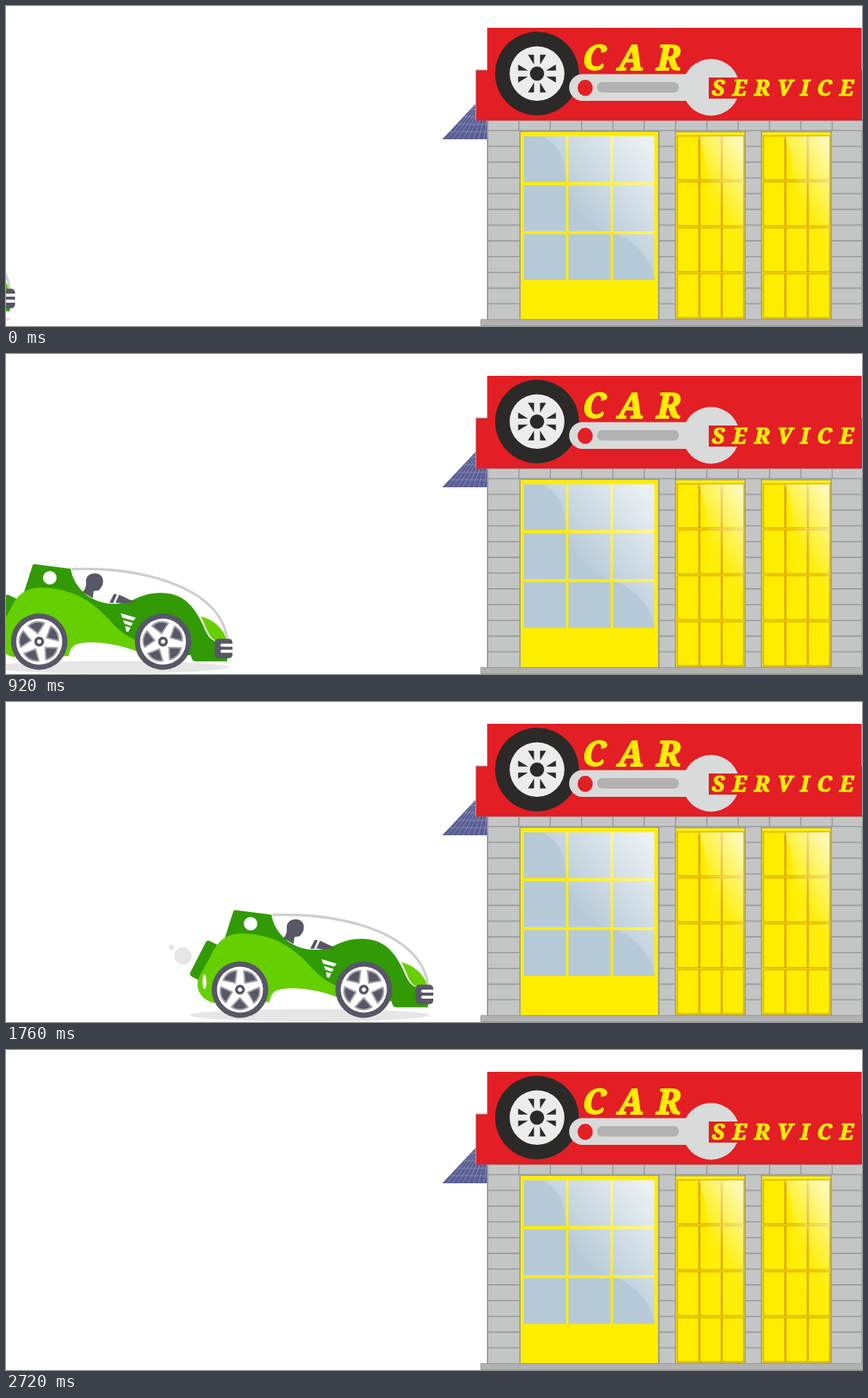
An HTML page for the animation above (3.12 s loop, 1134 by 425 pixels).

```html
<!DOCTYPE html>
<html lang="en">
<head>
<meta charset="utf-8">
<title>Car service</title>
<style>
html, body { margin: 0; width: 100%; height: 100%; overflow: hidden; background: #fff; }
svg { display: block; width: 100%; height: 100%; }
text { font-family: "Noto Serif", "Liberation Serif", serif; font-weight: 900; font-style: italic; fill: #ffed00; stroke: #ffed00; }
</style>
</head>
<body>
<svg viewBox="0 0 1134 425">
  <defs>
    <linearGradient id="glass" gradientUnits="userSpaceOnUse" x1="852" y1="185" x2="757" y2="262">
      <stop offset="0" stop-color="#fff" stop-opacity=".72"/>
      <stop offset="1" stop-color="#fff" stop-opacity=".06"/>
    </linearGradient>
    <linearGradient id="shine" gradientUnits="userSpaceOnUse" x1="92" y1="30" x2="36" y2="62">
      <stop offset="0" stop-color="#fff" stop-opacity=".7"/>
      <stop offset="1" stop-color="#fff" stop-opacity=".04"/>
    </linearGradient>
    <g id="wheel"></g>
  </defs>

  <g id="car">
    <ellipse cx="256" cy="416" rx="159" ry="8.3" fill="#e6e6e6"/>
    <g id="smoke" fill="#e6e6e6"></g>
    <g id="body">
      <path d="M119 319Q121 317 124 318L134 323L111 371L100 365Q97 363 98 360Z" fill="#329a05"/>
      <path d="M142 320L155 279Q156 276.500 159 277L206 283C207 298 222 324 254 329C288 333 292 315 325 315C358 315 371 337 381 358C386 371 391 377 397 379L413 401V406H371Q366 406 365 398L292 392C262 372 225 320 142 320Z" fill="#329a05"/>
      <path d="M128 400C110 394 105 380 109 368C113 358 120 349 126 336C135 316 148 308 166 308C210 308 238 330 256 350C270 366 282 374 295 379L296 394C272 383 228 376 210 385Q204 390 203 399Z" fill="#66cf00"/>
      <path d="M378 346C395 351 408 362 412 377L397 378C389 375 385 360 378 346Z" fill="#66cf00"/>
      <path d="M207 283.500C312 280 407 313 413 378" fill="none" stroke="#cecece" stroke-width="3.2"/>
      <g fill="#575766">
        <path d="M226 299C226 287 247 285 248.500 298C249 306 245 309 243 311.500C240 313 236.500 311 236 314L235 322L221.500 314Q227 309 226 299Z"/>
        <path d="M257 328L263 316.500L267 317L262 328.500ZM265 328L270 317.500L290 327Q278 330 265 328Z"/>
        <rect x="396.500" y="376" width="23.500" height="26" rx="5"/>
      </g>
      <path d="M420 384.500H406M420 392.500H406" stroke="#fff" stroke-width="4" stroke-linecap="round"/>
      <ellipse cx="117" cy="372" rx="2.600" ry="10" fill="#fff"/>
      <path d="M272 342L292 348L289 352L274 348ZM275 351L288 355L286 359L277 356ZM278 359L285 361L282 367L279 366Z" fill="#fff"/>
      <circle cx="178" cy="295" r="9" fill="#fff"/>
    </g>
    <g id="wheels"></g>
  </g>

  <g id="garage">
    <path d="M578 177L624 128H638V177Z" fill="#585d94"/>
    <path id="solar" fill="none" stroke="#9a9cbc" stroke-width=".7"/>
    <rect x="638" y="152" width="498" height="265" fill="#c4c6c6" stroke="#98999b" stroke-width="1.600"/>
    <path id="joints" stroke="#98999b" stroke-width="1.600"/>
    <rect x="629" y="416.500" width="510" height="8" fill="#b2b2b2" stroke="#999a9b"/>
    <path d="M638 29H1133.500V85H1134V152H623V85H638Z" fill="#e31e24"/>
    <path d="M637.500 29V85H622.500V152M1133.500 29V85" fill="none" stroke="#a8a0a0"/>
    <rect x="681" y="166.500" width="183.500" height="250" fill="#ffed00" stroke="#98999b" stroke-width="1.300"/>
    <path id="panes" fill="#b7cad8"/>
    <path d="M710 173H859V363C855 335 832 309 801 300C752 285 742 237 740 213C738 195 725 180 710 173Z" fill="url(#glass)"/>
    <g id="doors"></g>
  </g>

  <g id="sign">
    <circle cx="703.500" cy="89.700" r="55.500" fill="#2b2a29"/>
    <circle cx="703.500" cy="89.700" r="36.300" fill="#ececec"/>
    <g id="rim" fill="#2b2a29" transform="translate(703.500 89.700)"><circle r="9.500"/></g>
    <g fill="#d9dada">
      <rect x="746" y="90.500" width="180" height="35.500" rx="17.700"/>
      <circle cx="934" cy="108" r="37.700"/>
    </g>
    <rect x="931" y="95" width="203" height="28" fill="#e31e24"/>
    <rect x="783" y="101" width="108.500" height="14" rx="7" fill="#b2b2b2"/>
    <ellipse cx="767.300" cy="108.700" rx="10" ry="10.700" fill="#e31e24"/>
    <text x="764" y="84.500" font-size="45" letter-spacing="17" stroke-width="1.800">CAR</text>
    <text x="935" y="118.500" font-size="29" letter-spacing="10.500" stroke-width="1.200">SERVICE</text>
  </g>
</svg>

<script>
const $ = id => document.getElementById(id);
const LOOP = 3120, STEP = 40, GONE = 2720;
const range = (n, f) => Array.from({ length: n }, (_, i) => f(i)).join('');
const box = (x, y, w, h) => `M${x} ${y}h${w}v${h}h${-w}z`;

// Brickwork: one row of blocks on top, then four pillars
$('joints').setAttribute('d',
  'M638 165.500H1134' + range(11, i => `M${679.5 + i * 41.5} 152v13`) +
  [[638, 681], [865, 887], [979, 1001], [1093, 1134]].map(([a, b]) =>
    `M${b} 165V417M${a} 165V417` + range(11, i => `M${a} ${186.5 + i * 20.9}H${b}`)).join(''));

$('solar').setAttribute('d',
  range(8, i => `M${584 + i * 7} 177L${626 + i * 2} 128`) +
  range(4, i => `M${587 + i * 9} ${167 - i * 10}H638`));

$('panes').setAttribute('d',
  range(9, i => box(686 + i % 3 * 59, 173 + (i / 3 | 0) * 65, i % 3 > 1 ? 55 : 56, 61)));

$('doors').innerHTML = [887, 1001].map(x => `<g transform="translate(${x} 167)">
  <rect width="92" height="249" fill="#ffed00" stroke="#98999b" stroke-width="1.300"/>
  <path d="${range(12, i => box(2.5 + i % 3 * 29.7, 5.5 + (i / 3 | 0) * 61, 28.3, 58.5))}" fill="none" stroke="#dfaa00" stroke-width="1.500"/>
  <path d="M29 6H90V247C86 205 72 182 58 160C45 140 47 110 43 78C41 40 37 18 29 6Z" fill="url(#shine)"/>
</g>`).join('');

$('rim').innerHTML += range(4, i =>
  `<path d="M-4 -25V-12L-12 -25ZM4 -25V-12L12 -25Z" transform="rotate(${i * 90})"/>`);

$('wheel').innerHTML = '<circle r="37.500" fill="#575766"/><circle r="30.500" fill="#fff"/>' +
  range(5, i => `<path d="M0 -11L-11 -23Q0 -30 11 -23Z" fill="#575766" stroke="#a2a2ac" stroke-width="2" stroke-linejoin="round" transform="rotate(${36 + i * 72})"/>`) +
  '<circle r="6.500" fill="#575766"/><circle r="2.800" fill="#fff"/>';
$('wheels').innerHTML = '<use href="#wheel"/>'.repeat(2);
const wheels = [...$('wheels').children];

// Position of the nose: [time, x]
const path = [[0, 12], [560, 189], [600, 203], [920, 300], [1280, 420], [1760, 566], [2080, 657], [2240, 701], [GONE, 962]];
function noseAt(t) {
  const i = Math.max(1, path.findIndex(p => p[0] >= t));
  const [t0, x0] = path[i - 1], [t1, x1] = path[i];
  return x0 + (x1 - x0) * (t - t0) / (t1 - t0);
}

// Exhaust puffs: birth, end, drift, rise, radius, fade rate
const puffs = [
  [1100, 2000, 38, 14, 6, .05],
  [1240, 2000, 25.5, 3, 11.5, .55],
  [2000, 2560, 26, 3, 11, .55]
];
function puff(t, [birth, end, drift, rise, size, fade]) {
  if (t < birth || t > end) return '';
  const u = ((t - birth) / 630) ** .4;
  const r = Math.min(size * Math.min(1, .5 + u), Math.sqrt(fade * (end - t)));
  return `<circle cx="${112 - drift * u}" cy="${340 - rise * u}" r="${r}"/>`;
}

function draw(now) {
  const t = Math.floor(now % LOOP / STEP) * STEP;
  $('car').style.display = t < GONE ? '' : 'none';
  if (t < GONE) {
    const x = noseAt(t);
    const bob = .8 + 2.7 * Math.sin((t - 1280) / 240 * 2 * Math.PI - Math.PI / 6);
    $('car').setAttribute('transform', `translate(${x - 420} 0)`);
    $('body').setAttribute('transform', `translate(0 ${bob})`);
    wheels.forEach((w, i) =>
      w.setAttribute('transform', `translate(${164 + i * 164} 382) rotate(${x / 37.5 * 180 / Math.PI})`));
    $('smoke').innerHTML = puffs.map(p => puff(t, p)).join('');
  }
}
const start = performance.now();
function tick() {
  draw(performance.now() - start);
  requestAnimationFrame(tick);
}
tick();
</script>
</body>
</html>
```
